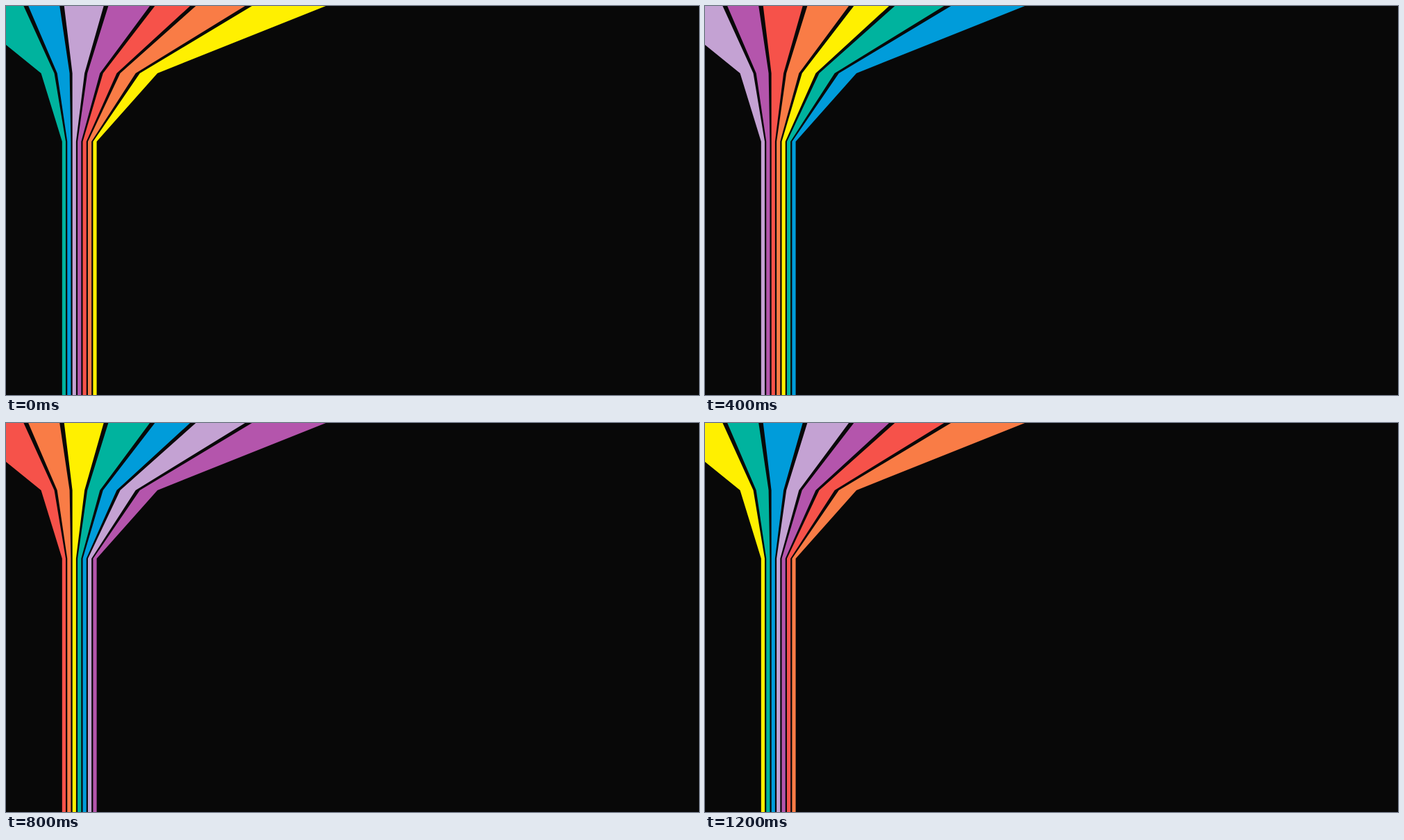
Write an HTML page that moves like this. It is 998 by 561 pixels and loops after 1400 ms.

```html
<!DOCTYPE html>
<html lang="en">
<head>
<meta charset="utf-8">
<title>Rainbow stripes</title>
<style>
  html, body { margin: 0; width: 100%; height: 100%; overflow: hidden; background: #080808; }
  svg { display: block; width: 100%; height: 100%; }
</style>
</head>
<body>
<svg viewBox="0 0 998 561"></svg>
<script>
const COLORS = ['#00b39e', '#009cda', '#c4a2d3', '#b455ac', '#f6524a', '#f97c46', '#fff000'];
const STEP = 200, BEND = 97, NECK = 195.5, BOTTOM = 561;

// Where the dark rays between the stripes meet the top of the stage
const TOP = [-73, 28.8, 80.5, 144, 210.7, 269.2, 349.2, 467];

// Outline of one side of ray i; side is 1 for its right edge, -1 for its left
function edge(i, side) {
  const neck = 79.7 + 7.43 * i;
  const bend = 48 + 24.89 * i - 1.46 * i ** 2 + 0.208 * i ** 3;
  const spread = side / 2 * Math.hypot(1, (TOP[i] - neck) / NECK);
  const stem = neck + side * 1.12;
  return [
    [TOP[i] + 6.5 * spread, 0], [bend + 4 * spread, BEND],
    [stem, NECK], [stem, BOTTOM]
  ];
}

const svg = document.querySelector('svg');
const stripes = COLORS.map((_, i) => {
  const shape = document.createElementNS('http://www.w3.org/2000/svg', 'polygon');
  shape.setAttribute('points', [...edge(i, 1), ...edge(i + 1, -1).reverse()].join(' '));
  return svg.appendChild(shape);
});

// Colours move one stripe to the left on every step
function draw(time) {
  const step = Math.floor(time / STEP);
  stripes.forEach((shape, i) => shape.setAttribute('fill', COLORS[(i + step) % COLORS.length]));
}

let start;
function tick(now) {
  start ??= now;
  draw(now - start);
  requestAnimationFrame(tick);
}
draw(0);
requestAnimationFrame(tick);
</script>
</body>
</html>
```
